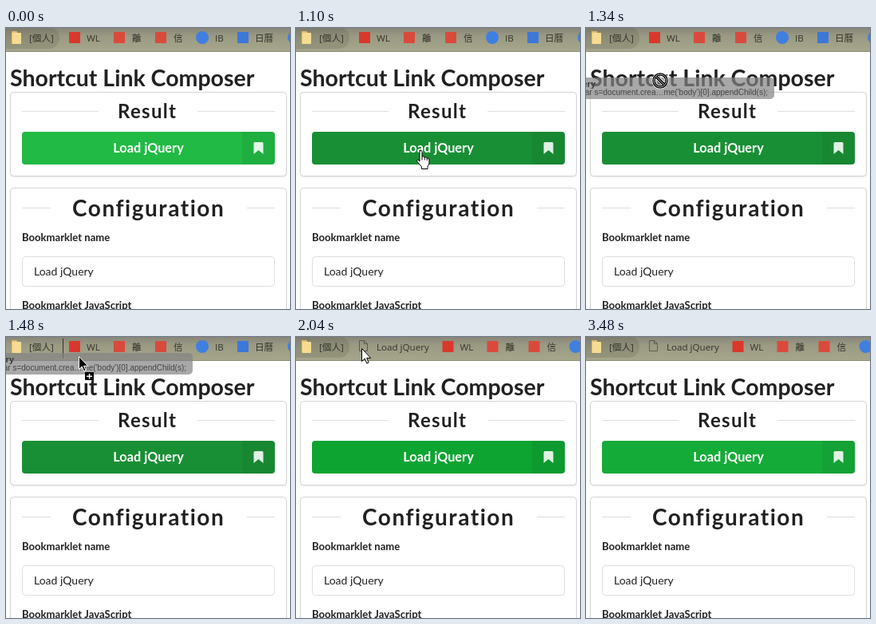
An HTML page with a canvas that plays this animation: 356 px wide and 352 px high, repeating every 3.55 s.

```html
<!DOCTYPE html>
<html lang="en">
<head>
<meta charset="utf-8">
<title>Drag a bookmarklet to the bar</title>
<style>
html, body { margin: 0; width: 356px; height: 352px; overflow: hidden; background: #fff; }
canvas { display: block; }
</style>
</head>
<body>
<canvas id="stage" width="356" height="352"></canvas>
<script>
const ctx = document.getElementById('stage').getContext('2d');
const LOOP = 3550;
const INK = '#212121', LINE = '#dededf';
const BAR_FONT = '11.6px "Open Sans", "Noto Sans CJK TC", "Noto Sans CJK", sans-serif';
const lato = (size, weight = 700) => `${weight} ${size}px Lato, sans-serif`;

// [start ms, pointer, x, y]
const POINTER = [
  [0, ''], [70, 'arrow', 176, 200],
  [140, 'hand', 168, 136], [310, 'hand', 167, 143], [380, 'hand', 165, 151], [460, 'hand', 164, 157],
  [690, 'hand', 162, 158], [760, 'hand', 160, 158], [840, 'hand', 158, 159], [1100, 'hand', 151, 153],
  [1170, 'deny', 132, 130], [1250, 'deny', 96, 90], [1340, 'deny', 93, 66], [1410, 'deny', 92, 44],
  [1480, 'copy', 91, 24], [1560, 'copy', 87, 17], [1630, 'copy', 84, 16], [1800, 'copy', 82, 14],
  [1940, 'arrow', 82, 14], [2090, 'arrow', 90, 28], [2170, 'arrow', 118, 72], [2250, 'hand', 166, 134],
  [2330, 'arrow', 220, 186], [2400, 'arrow', 267, 232], [2490, 'beam', 306, 316], [2570, '']
];
const BUTTON = [
  [0, '#21ba45'], [140, '#16ab39'], [1100, '#198f35'], [1940, '#149934'], [2040, '#0ea432'], [3480, '#15ab38']
];
const at = (steps, t) => steps.findLast(step => step[0] <= t);

function rect(x, y, w, h, fill, radius = 0, stroke) {
  ctx.beginPath();
  ctx.roundRect(x, y, w, h, radius);
  if (fill) { ctx.fillStyle = fill; ctx.fill(); }
  if (stroke) { ctx.strokeStyle = stroke; ctx.lineWidth = 1; ctx.stroke(); }
}

function text(str, x, y, font, color = INK, align = 'left', spacing = 0) {
  ctx.font = font;
  ctx.fillStyle = color;
  ctx.textAlign = align;
  ctx.letterSpacing = spacing + 'px';
  ctx.fillText(str, x, y);
}

function shape(d, fill, stroke, width = 1) {
  const path = new Path2D(d);
  if (fill) { ctx.fillStyle = fill; ctx.fill(path); }
  if (stroke) { ctx.strokeStyle = stroke; ctx.lineWidth = width; ctx.stroke(path); }
}

function disc(x, y, r, fill) {
  ctx.beginPath();
  ctx.arc(x, y, r, 0, Math.PI * 2);
  ctx.fillStyle = fill;
  ctx.fill();
}

function bookmarksBar(dropped, dropping) {
  const shade = ctx.createLinearGradient(0, 0, 0, 29);
  shade.addColorStop(0, '#88867a');
  shade.addColorStop(.35, '#9a9a83');
  shade.addColorStop(1, '#a5a68b');
  rect(0, 0, 356, 29, shade);
  rect(0, 29, 356, 1, '#8f8d78');
  if (!dropping) rect(-12, -1, 79, 27, 'rgba(60,60,40,.14)', 13);
  rect(7, 4, 7, 16, '#e3bd6b', 1);
  rect(8, 6, 11, 14, '#f6dc93', 1);
  const label = (str, x) => text(str, x, 17, BAR_FONT, '#33332d');
  label('[個人]', 29);
  if (dropped) {
    shape('M79.5 4.500h6l4 4v9h-10zM85.500 4.500v4h4', '', '#5c5b51');
    label('Load jQuery', 101);
  }
  ctx.save();
  if (dropped) ctx.translate(104.5, 0);
  rect(79, 5, 14, 14, '#d8392c');
  label('WL', 101);
  rect(135, 5, 14, 14, '#d94a3d');
  label('離', 158);
  rect(187, 5, 14, 14, '#d94a3d');
  label('信', 210);
  disc(246, 12, 8, '#3f7fe0');
  label('IB', 262);
  rect(290, 5, 14, 14, '#3d77d8');
  label('日曆', 312);
  disc(361, 12, 8, '#3f7fe0');
  ctx.restore();
  if (dropping) rect(71, 2, 1, 25, '#33332d');
}

function card(y, h) {
  ctx.save();
  ctx.shadowColor = 'rgba(34,36,38,.15)';
  ctx.shadowBlur = 2;
  ctx.shadowOffsetY = 1;
  rect(5.5, y, 346, h, '#fff', 4);
  ctx.restore();
  rect(5.5, y, 346, h, '', 4, '#d4d4d5');
}

function divider(label, x, y, size, left, right, lineY) {
  rect(20, lineY, left - 20, 1, LINE);
  rect(right, lineY, 337 - right, 1, LINE);
  text(label, x, y, lato(size), INK, 'left', size * .055);
}

function page(green) {
  rect(0, 30, 356, 322, '#fff');
  text('Shortcut Link Composer', 5, 73, lato(28.5));
  card(80.5, 105);
  divider('Result', 140, 113, 24, 116, 240, 104);
  rect(20, 130, 317, 41, green, 4);
  rect(296, 130, 41, 41, 'rgba(0,0,0,.06)', [0, 4, 4, 0]);
  text('Load jQuery', 178.5, 156, lato(16.3), '#fff', 'center');
  shape('M310.500 144.500q0-1.500 1.500-1.500h9q1.500 0 1.500 1.500v13.500l-6-5-6 5z', 'rgba(255,255,255,.87)');
  card(200.5, 170);
  divider('Configuration', 83, 236, 28, 56, 302, 225);
  text('Bookmarklet name', 20, 267, lato(13.1));
  rect(20.5, 286.5, 316, 37, '#fff', 4, LINE);
  text('Load jQuery', 35, 310, lato(14, 400));
  text('Bookmarklet JavaScript', 20, 352, lato(13.1));
}

function dragImage(x, y) {
  rect(x - 250, y - 4, 393, 27, 'rgba(132,132,132,.7)', 5);
  const sans = '"Liberation Sans", Arial, sans-serif';
  text('Load jQuery', x - 81, y + 8, `bold 11px ${sans}`, '#3c3c3c', 'right');
  text("var s=document.crea…me('body')[0].appendChild(s);", x + 135, y + 18, `10px ${sans}`, '#444', 'right');
}

const ARROW = 'M.5.5v16l3.7-3.5 2.6 6 2.3-1-2.6-5.7h5.2z';
const pointers = {
  arrow() { shape(ARROW, '#fff', '#000'); },
  copy() {
    shape(ARROW, '#000', '#fff');
    rect(8, 20, 11, 10, '#000');
    rect(10, 24.5, 7, 1.5, '#fff');
    rect(12.8, 22, 1.5, 6.5, '#fff');
  },
  hand() {
    shape('M4 2q0-1.5 1.5-1.5T7 2v6q2.8-1 3.2 1 2.6-.8 3 1 2.8-.4 2.8 2v4q0 2-2 4.500v3H6.500v-2.500L1 14.500q-1-2 .5-2.500 1.500 0 2.500 2z', '#fff', '#000');
    shape('M7 8v4.500M10.200 9v3.500M13.200 10v3', '', '#000');
  },
  deny() {
    for (const [color, width] of [['#fff', 5], ['#000', 3.5], ['#bbb', 1]]) {
      shape('M-8 0a8 8 0 1 0 16 0a8 8 0 1 0-16 0M-5.6-5.6L5.6 5.6', '', color, width);
    }
  },
  beam() { shape('M-3-8.500h2.500l.5.5.5-.5H3M0-8V8M-3 8.500h2.500l.5-.5.5.5H3', '', '#000'); }
};

function draw(t) {
  const [, kind, x, y] = at(POINTER, t);
  page(at(BUTTON, t)[1]);
  bookmarksBar(t >= 1940, kind === 'copy');
  if (kind === 'copy' || kind === 'deny') dragImage(x, y);
  if (!kind) return;
  ctx.save();
  ctx.translate(x, y);
  pointers[kind]();
  ctx.restore();
}

const start = performance.now();
(function tick() {
  draw((performance.now() - start) % LOOP);
  requestAnimationFrame(tick);
})();
</script>
</body>
</html>
```
